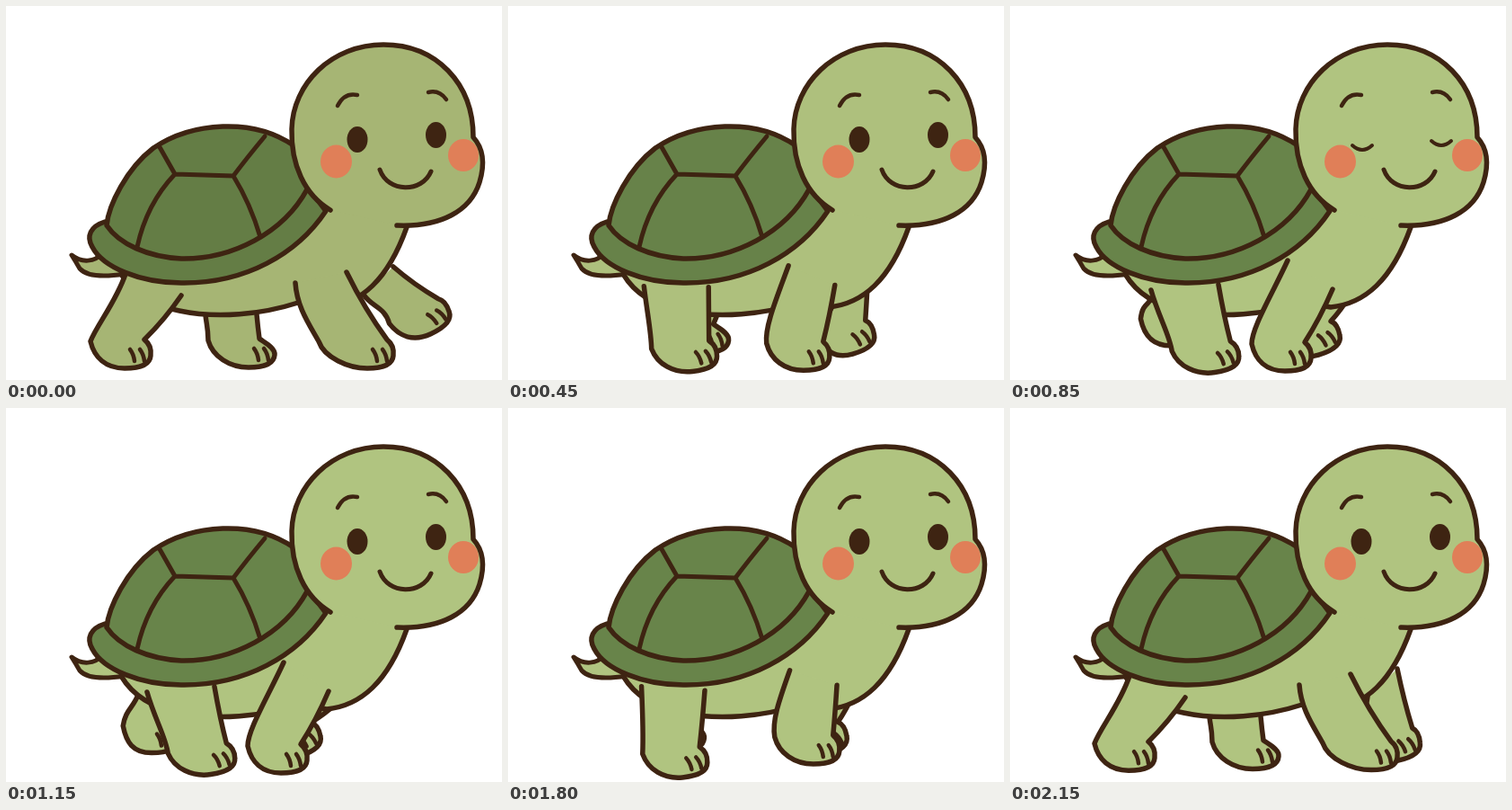
Recreate the animation shown at these times as an HTML page with a canvas. Size 552 px wide and 416 px high, loop 2200 ms.

```html
<!DOCTYPE html>
<html lang="en">
<head>
<meta charset="utf-8">
<title>Walking turtle</title>
<style>
html, body { margin: 0; width: 552px; height: 416px; overflow: hidden; background: #fff; }
canvas { display: block; }
</style>
</head>
<body>
<canvas id="stage" width="552" height="416"></canvas>
<script>
const ctx = document.getElementById('stage').getContext('2d');
const LOOP = 2200, STEP = 50, REST = 2150;
const INK = '#3e2412', CHEEK = '#e07f58', LINE = 5.5;

// Each leg swings between two poses: left hip, right hip, sole, heel offset, tilt
const farHind = {
  fore: [222, 343, 279, 343, 267, 402, -42, 0],
  back: [143, 317, 185, 330, 153, 388, -28, 0],
  ankle: 15, bow: 0, liftOut: 14, liftBack: 11
};
const farFront = {
  fore: [398, 321, 431, 290, 428, 393, -34, -12],
  back: [330, 325, 365, 330, 318, 388, -22, -18],
  ankle: 27, bow: 0, liftOut: 0, liftBack: 2, raised: true
};
const nearHind = {
  fore: [133, 298, 195, 322, 129, 403, -35, 0],
  back: [157, 316, 232, 310, 225, 408, -41, -8],
  ankle: 25, bow: 1, liftOut: 0, liftBack: -5
};
const nearFront = {
  fore: [322, 308, 379, 296, 399, 403, -51, 0],
  back: [309, 283, 359, 315, 303, 406, -34, 0],
  ankle: 25, bow: -6, liftOut: 0, liftBack: 9
};

const mix = (a, b, k) => a + (b - a) * k;
const clamp = v => Math.max(0, Math.min(1, v));
const ease = v => Math.sin(clamp(v) * Math.PI / 2);
const bump = v => Math.sin(clamp(v) * Math.PI) ** 2;

// Near legs hold at the back; far legs keep easing back before they return
const nearSway = t => clamp(Math.min(t / 590, (REST - t) / 540));
const farSway = t => Math.min(ease(t / 1450), ease((REST - t) / 700));

function tone(a, b, k) {
  return `rgb(${a.map((v, i) => Math.round(mix(v, b[i], k)))})`;
}

function line(d, width = LINE) {
  ctx.lineWidth = width;
  ctx.stroke(new Path2D(d));
}

function fill(d, color) {
  ctx.fillStyle = color;
  ctx.fill(new Path2D(d));
}

function oval(x, y, rx, ry, color) {
  ctx.fillStyle = color;
  ctx.beginPath();
  ctx.ellipse(x, y, rx, ry, 0, 0, Math.PI * 2);
  ctx.fill();
}

function drawLeg(leg, sway, t, skin) {
  let [lx, ly, rx, ry, fx, fy, heel, tilt] = leg.fore.map((v, i) => mix(v, leg.back[i], sway));
  fy -= leg.liftOut * bump(t / 1450) + leg.liftBack * bump((t - 1450) / 750);
  if (leg.raised) {
    const up = clamp(1 - t / 500);
    fx += 42 * up;
    fy -= 27 * up;
    tilt -= 13 * up;
  }
  const c = Math.cos(tilt * Math.PI / 180), s = Math.sin(tilt * Math.PI / 180);
  const at = (x, y) => [fx + x * c - y * s, fy + x * s + y * c];
  const [hx, hy] = at(heel, -30), [ax, ay] = at(leg.ankle, -32);
  ctx.beginPath();
  ctx.moveTo(lx, ly);
  ctx.bezierCurveTo(mix(lx, hx, 0.3) + leg.bow, mix(ly, hy, 0.42), mix(hx, lx, 0.15) + leg.bow, hy - 18, hx, hy);
  ctx.bezierCurveTo(...at(heel * 0.88, -12), ...at(-18, 0), ...at(3, 0));
  ctx.bezierCurveTo(...at(16, 0), ...at(31, -2), ...at(32, -14));
  ctx.bezierCurveTo(...at(33, -22), ...at(leg.ankle + 5, -28), ax, ay);
  ctx.quadraticCurveTo(mix(rx, ax, 0.45), mix(ry, ay, 0.55), rx, ry);
  ctx.fillStyle = skin;
  ctx.fill();
  ctx.lineWidth = LINE;
  ctx.stroke();
  ctx.lineWidth = 4.5;
  for (const x of [9, 20]) {
    ctx.beginPath();
    ctx.moveTo(...at(x, -21));
    ctx.quadraticCurveTo(...at(x + 4, -16), ...at(x + 5, -8));
    ctx.stroke();
  }
}

function drawBody(skin) {
  const tail = 'M73 277C84 286 99 285 107 275L132 298C113 301 91 302 82 292Q78 285 73 277Z';
  fill(tail, skin);
  line(tail, 5);
  const belly = 'M128 298C140 318 160 333 193 339C235 348 285 343 325 330L357 335C395 331 425 305 446 246';
  fill(belly + 'L440 225L375 205L300 250Z', skin);
  line(belly);
}

function drawShell(shade) {
  const rim = 'M110 240C94 245 89 256 96 268C108 291 150 308 195 308C266 309 324 276 356 228L335 200';
  fill(rim + 'Z', shade);
  line(rim);
  const dome = 'M335 204C309 252 252 282 195 281C158 279 126 265 112 244C114 222 134 181 164 158C207 129 275 124 320 155';
  fill(dome + 'Z', shade);
  line(dome);
  line('M171 157L188 187L253 189Q268 169 288 145M188 187C166 210 153 236 146 268M253 189Q272 220 283 257', 5);
}

function drawHead(skin, asleep) {
  const head = 'M361 227C332 210 317 176 318 137C319 86 363 43 420 43C479 43 520 86 520 146C531 158 533 176 527 196C517 228 484 246 435 244';
  fill(head + 'Z', skin);
  ctx.save();
  ctx.clip(new Path2D(head + 'Z'));
  oval(509, 166, 17, 18, CHEEK);
  ctx.restore();
  oval(367.5, 173, 17.5, 18.5, CHEEK);
  line(head);
  line('M369 111C374 101 382 97 391 99M470 96C478 94 485 97 490 104', 4.5);
  line('M416 182C425 208 463 208 473 184', 5);
  if (asleep) {
    line('M381 155Q392 165 403 155M469 150Q480 160 491 150', 4);
  } else {
    oval(391, 148.5, 11.5, 14.5, INK);
    oval(478.5, 143.5, 11.5, 14.5, INK);
  }
}

function draw(t) {
  const warm = clamp(t / 600);
  const skin = tone([166, 181, 116], [176, 196, 128], warm);
  const shade = tone([100, 125, 69], [104, 132, 74], warm);
  ctx.fillStyle = '#fff';
  ctx.fillRect(0, 0, 552, 416);
  ctx.strokeStyle = INK;
  ctx.lineCap = ctx.lineJoin = 'round';
  for (const leg of [farHind, farFront]) drawLeg(leg, farSway(t), t, skin);
  drawBody(skin);
  for (const leg of [nearHind, nearFront]) drawLeg(leg, nearSway(t), t, skin);
  drawShell(shade);
  drawHead(skin, t >= 750 && t < 950);
}

const start = performance.now();
function tick() {
  const t = (performance.now() - start) % LOOP;
  draw(Math.floor(t / STEP) * STEP);
  requestAnimationFrame(tick);
}
tick();
</script>
</body>
</html>
```
